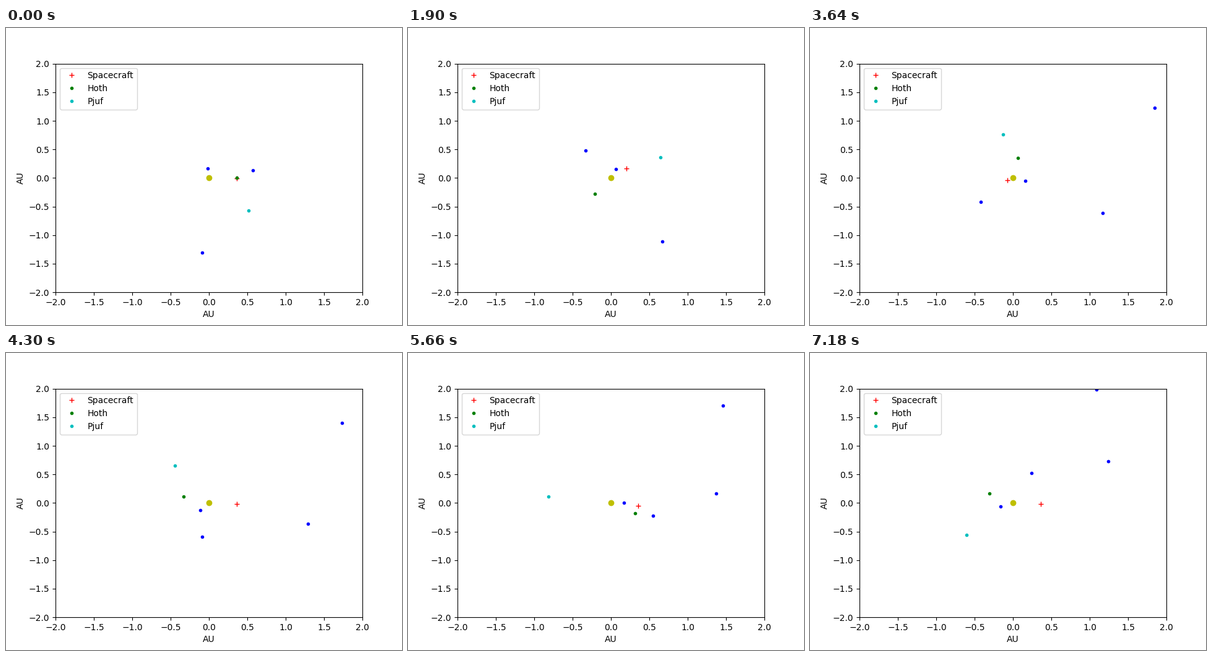
Recreate the animation shown at these times as a matplotlib script. Size 640x480 px, loop 7200 ms.

```python
import numpy as np
import matplotlib.pyplot as plt
from matplotlib.animation import FuncAnimation

FRAMES = 360

# style, label, semi-major axis (AU), eccentricity,
# periapsis angle, start anomaly and daily motion (degrees)
BODIES = [
    ("r+", "Spacecraft", 0.2215, 0.643, 180.0, 176.5, 4.993),
    ("g.", "Hoth", 0.356, 0.024, 190.0, 169.5, 2.433),
    ("c.", "Pjuf", 0.7853, 0.0539, 21.8, -63.8, 0.7445),
    ("b.", None, 0.1705, 0.025, 90.0, 5.2, 7.308),
    ("b.", None, 0.587, 0.014, 95.0, -80.4, 1.147),
    ("b.", None, 1.4415, 0.102, 294.3, -23.05, 0.2993),
    ("b.", None, 2.326, 0.052, 0.0, 4.06, 0.14505),
]


def orbit(step, a, e, peri, start, motion):
    """Position on a Kepler ellipse with the star at the origin."""
    mean = np.radians((start + motion * step) % 360)
    ecc = mean if e < 0.5 else np.pi
    for _ in range(12):
        ecc -= (ecc - e * np.sin(ecc) - mean) / (1 - e * np.cos(ecc))
    u = a * (np.cos(ecc) - e)
    v = a * np.sqrt(1 - e * e) * np.sin(ecc)
    c, s = np.cos(np.radians(peri)), np.sin(np.radians(peri))
    return u * c - v * s, u * s + v * c


fig, ax = plt.subplots(figsize=(6.4, 4.8), dpi=100)
ax.set(xlim=(-2, 2), ylim=(-2, 2), xlabel="AU", ylabel="AU")
ax.plot(0, 0, "yo")
dots = [ax.plot([], [], style, label=label)[0] for style, label, *_ in BODIES]
ax.legend(handles=dots[:3], loc="upper left")


def update(step):
    for dot, (_, _, *elements) in zip(dots, BODIES):
        x, y = orbit(step, *elements)
        dot.set_data([x], [y])
    return dots


anim = FuncAnimation(fig, update, frames=FRAMES, interval=20,
                     repeat=True, repeat_delay=0, blit=True)
plt.show()
```
